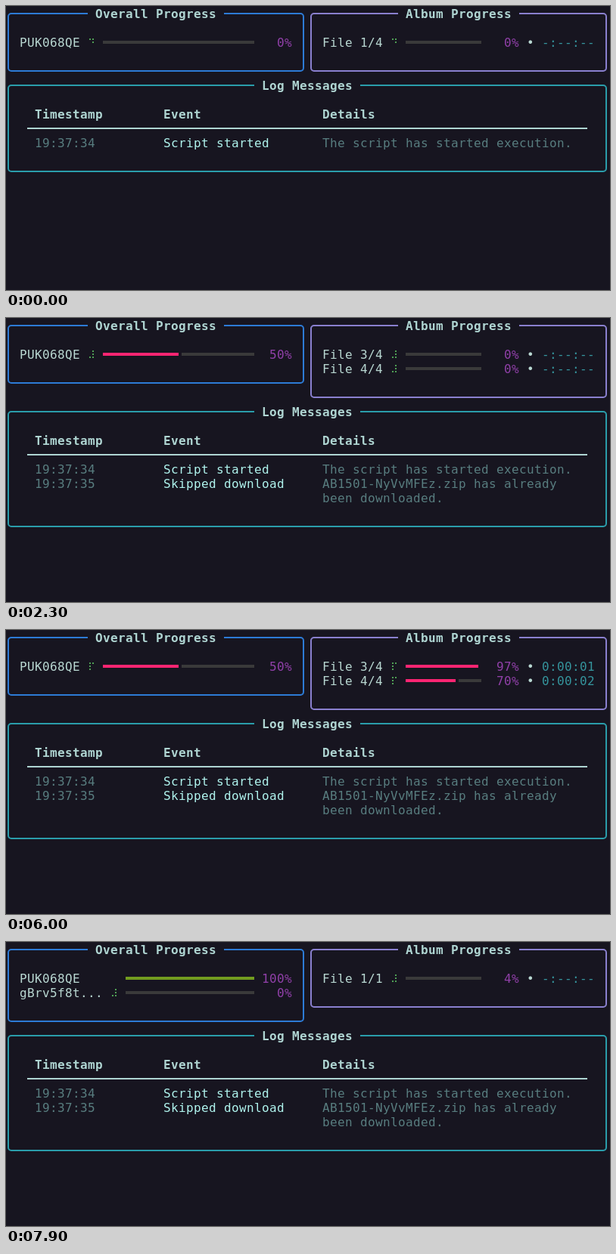
An HTML page with a canvas for the animation above (8 s loop, 798 px wide and 376 px high).

```html
<!DOCTYPE html>
<html>
<head>
<meta charset="utf-8">
<style>
  html, body { margin: 0; width: 100%; height: 100%; overflow: hidden; background: #171520; }
  canvas { display: block; }
</style>
</head>
<body>
<canvas id="screen" width="798" height="376"></canvas>
<script>
const ctx = document.getElementById('screen').getContext('2d');
const LOOP = 8000;
const FONT = '16px "DejaVu Sans Mono", monospace';
const COLOR = {
  bg: '#171520', text: '#b9d8d2', title: '#afd5d2', dim: '#587d7f', event: '#b0f4ee',
  overall: '#2d7bd6', album: '#8a80cf', log: '#2a9dab', spinner: '#4fa055',
  track: '#3a3a3a', bar: '#fb2572', finished: '#729c1f', percent: '#9140a9', eta: '#35959d',
};

// Terminal grid: 10 x 19 pixel cells
const X = col => col * 10 - 2;
const Y = row => row * 19 + 10;

// Refreshes are sampled every 100 ms; these samples repeat the previous picture
const HOLDS = [500, 1000, 1800, 2100, 2600, 3500, 4300, 4700, 5300, 6100, 7700];

// [time, value] points
const SPINNER = [[0, 1.2], [1700, 17.2], [2300, 24.2], [3800, 43.2], [5100, 58.2], [7900, 94.2]];
const FILES = [
  { name: 'File 1/4', from: 0, to: 2200, points: [[800, 0], [1700, 69], [2000, 100]] },
  { name: 'File 2/4', from: 200, to: 700, points: [[700, 0]] },
  { name: 'File 3/4', from: 700, to: 6300, points: [[2500, 0], [3800, 44], [5100, 79.6], [6000, 97], [6200, 100]] },
  { name: 'File 4/4', from: 2000, to: 6500, points: [[3400, 0], [3800, 4.1], [5100, 36.4], [5900, 62], [6400, 100]] },
  { name: 'File 1/1', from: 7500, to: LOOP, points: [[7700, 0], [7900, 4]], noEta: true },
];
const OVERALL = [[0, 0], [700, 25], [2000, 50], [6200, 75], [6500, 100]];
const DOTS = '⠋⠙⠹⠸⠼⠴⠦⠧⠇⠏';

function lerpPoints(points, t) {
  if (t <= points[0][0]) return points[0][1];
  for (let i = 1; i < points.length; i++) {
    const [t0, v0] = points[i - 1], [t1, v1] = points[i];
    if (t <= t1) return v0 + (v1 - v0) * (t - t0) / (t1 - t0);
  }
  return points[points.length - 1][1];
}

function text(str, col, row, color, bold) {
  ctx.font = (bold ? 'bold ' : '') + FONT;
  ctx.fillStyle = color;
  [...str].forEach((ch, i) => ctx.fillText(ch, X(col + i), Y(row) + 6));
}

function rect(x, y, w, h, color) {
  ctx.fillStyle = color;
  ctx.fillRect(x, y, w, h);
}

function panel(col, cols, top, bottom, color, title) {
  ctx.strokeStyle = color;
  ctx.lineWidth = 2;
  ctx.beginPath();
  ctx.roundRect(X(col) + 5, Y(top), cols * 10 - 10, Y(bottom) - Y(top), 4);
  ctx.stroke();
  const width = title.length + 2;
  const start = col + (cols - width) / 2;
  rect(X(start), Y(top) - 3, width * 10, 6, COLOR.bg);
  text(title, start + 1, top, COLOR.title, true);
}

function spinner(col, row, t) {
  const bits = DOTS.charCodeAt(Math.floor(lerpPoints(SPINNER, t)) % 10) - 0x2800;
  for (let i = 0; i < 6; i++) {
    if (bits >> i & 1) rect(X(col) + 2 + 4 * (i / 3 | 0), Y(row) - 5 + 4 * (i % 3), 2, 2, COLOR.spinner);
  }
}

function bar(col, cols, row, percent) {
  const x = X(col), y = Y(row) - 2, width = cols * 10;
  if (percent >= 100) return rect(x, y, width, 4, COLOR.finished);
  const halves = Math.floor(cols * 2 * percent / 100);
  const filled = halves % 2 ? halves * 5 + 1 : halves * 5;
  const gap = halves ? 4 : 0;
  rect(x, y, filled, 4, COLOR.bar);
  rect(x + filled + gap, y, width - filled - gap, 4, COLOR.track);
}

function task(name, col, spinCol, barEnd, row, percent, t) {
  text(name, col, row, COLOR.text);
  if (percent < 100) spinner(spinCol, row, t);
  bar(spinCol + 2, barEnd - spinCol - 2, row, percent);
  text((Math.round(percent) + '%').padStart(4), barEnd + 1, row, COLOR.percent);
}

function eta(file, percent, t) {
  if (!percent || file.noEta) return '-:--:--';
  const seconds = Math.ceil((100 - percent) / percent * (t - file.points[0][0]) / 1000);
  return '0:00:' + String(Math.min(seconds, 59)).padStart(2, '0');
}

function drawOverall(t) {
  const second = t >= 7400;
  const spinCol = second ? 14 : 11;
  const percent = OVERALL.filter(p => p[0] <= t).pop()[1];
  const bottom = second ? 5 : 4;
  panel(0, 40, 0, bottom, COLOR.overall, 'Overall Progress');
  task('PUK068QE', 2, spinCol, 33, 2, percent, t);
  if (second) task('gBrv5f8t...', 2, spinCol, 33, 3, 0, t);
  return bottom;
}

function drawAlbum(t) {
  const files = FILES.filter(f => t >= f.from && t < f.to);
  const bottom = 3 + files.length;
  panel(40, 40, 0, bottom, COLOR.album, 'Album Progress');
  files.forEach((file, i) => {
    const row = 2 + i, percent = lerpPoints(file.points, t);
    task(file.name, 42, 51, 63, row, percent, t);
    text('•', 69, row, COLOR.text);
    text(eta(file, percent, t), 71, row, COLOR.eta);
  });
  return bottom;
}

function drawLog(t, top) {
  const lines = [['19:37:34', 'Script started', 'The script has started execution.']];
  if (t >= 700) lines.push(
    ['19:37:35', 'Skipped download', 'AB1501-NyVvMFEz.zip has already'],
    ['', '', 'been downloaded.']);
  const cols = [4, 21, 42];
  panel(0, 80, top, top + 5 + lines.length, COLOR.log, 'Log Messages');
  ['Timestamp', 'Event', 'Details'].forEach((s, i) => text(s, cols[i], top + 2, COLOR.title, true));
  rect(X(3), Y(top + 3) - 1, 740, 2, COLOR.title);
  lines.forEach((line, r) => line.forEach((s, i) =>
    text(s, cols[i], top + 4 + r, i === 1 ? COLOR.event : COLOR.dim)));
}

function draw(now) {
  let t = Math.floor(now % LOOP / 100) * 100;
  if (HOLDS.includes(t)) t -= 100;
  rect(0, 0, 798, 376, COLOR.bg);
  const bottom = Math.max(drawOverall(t), drawAlbum(t));
  drawLog(t, bottom + 1);
}

const start = performance.now();
function tick() {
  draw(performance.now() - start);
  requestAnimationFrame(tick);
}
tick();
</script>
</body>
</html>
```
